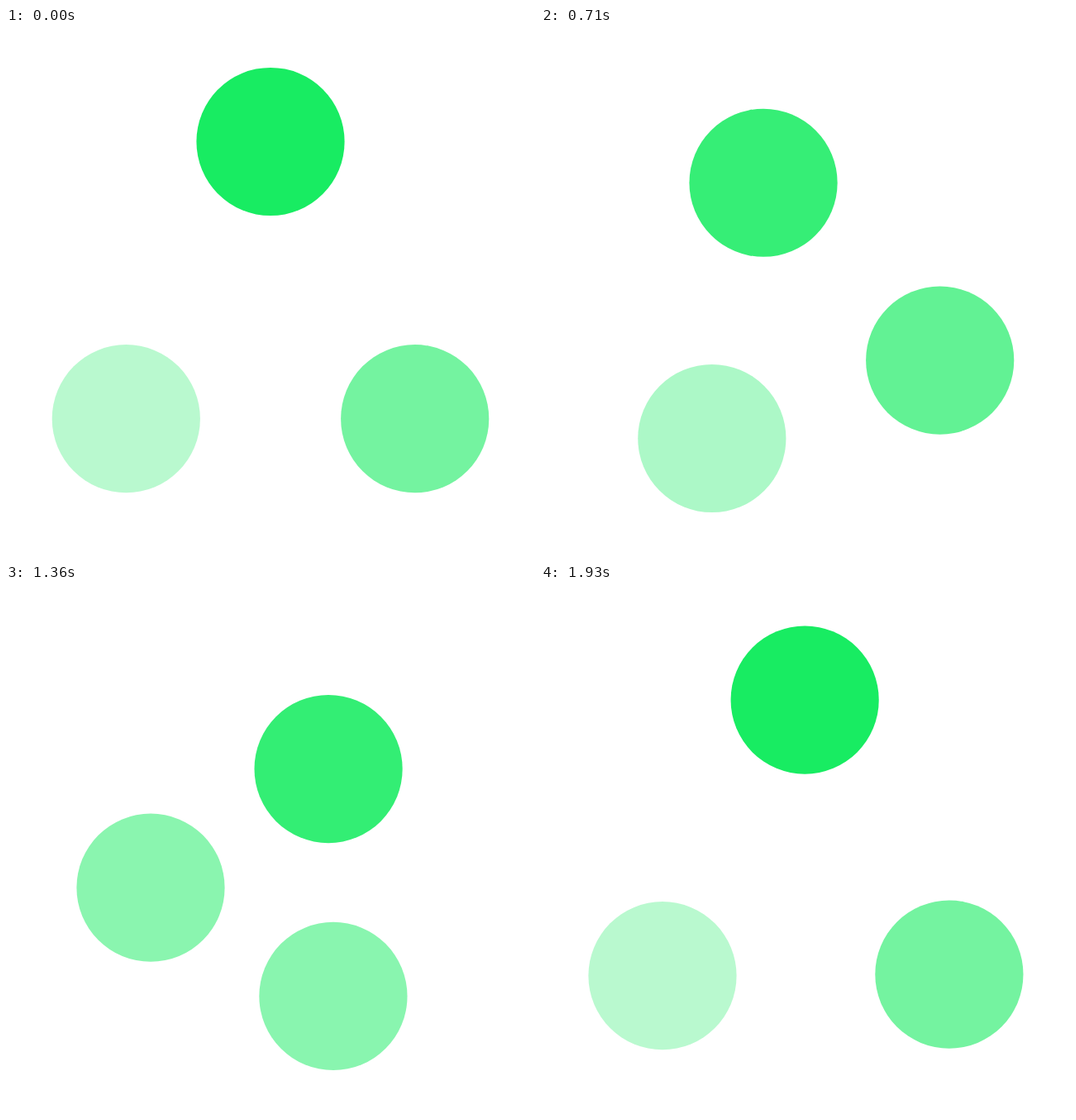
Write an HTML page that moves like this. It is 640 by 640 pixels and loops after 2000 ms.

```html
<!DOCTYPE html>
<html lang="en">
<head>
<meta charset="utf-8">
<title>Three circling dots</title>
<style>
html, body { margin: 0; width: 100%; height: 100%; overflow: hidden; background: #fff; }
svg { display: block; width: 100%; height: 100%; }
circle { fill: #18ec62; }
</style>
</head>
<body>
<svg viewBox="0 0 640 640"></svg>
<script>
const svg = document.querySelector('svg');
const LOOP = 2000, STEPS = 28, FRAMES = 50, LEG = 25;
const corners = [[320, 137.5], [494.7, 472.7], [145.3, 472.7]];
const alphas = [1, 0.6, 0.3];

const make = name => document.createElementNS('http://www.w3.org/2000/svg', name);
const shift = (p, from, to, k) => p.map((v, i) => v + (to[i] - from[i]) * k);
const ease = t => t * t * (3 - 2 * t);

function curve(...points) {
  const path = make('path');
  const [start, ...rest] = points;
  path.setAttribute('d', `M${start} C${rest.join(' ')}`);
  return path;
}

// Each dot visits the next two corners, passing smoothly through the middle one.
const dots = corners.map((a, i) => {
  const b = corners[(i + 1) % 3], c = corners[(i + 2) % 3];
  const circle = svg.appendChild(make('circle'));
  circle.setAttribute('r', 89.6);
  const legs = [
    curve(a, shift(a, a, b, 1 / 6), shift(b, a, c, -1 / 6), b),
    curve(b, shift(b, a, c, 1 / 6), shift(c, b, c, -1 / 6), c)
  ];
  return { circle, legs };
});

function draw(now) {
  // The picture is held in 28 steps per loop, taken from a 25 fps timeline.
  const time = Math.round(now / 10) * 10 % LOOP;
  const step = Math.floor((time + 5) * STEPS / LOOP) % STEPS;
  const frame = Math.ceil(step * FRAMES / STEPS);
  const leg = Math.floor(frame / LEG);
  const t = ease(frame % LEG / LEG);

  dots.forEach(({ circle, legs }, i) => {
    const path = legs[leg];
    const { x, y } = path.getPointAtLength(path.getTotalLength() * t);
    const from = alphas[(i + leg) % 3], to = alphas[(i + leg + 1) % 3];
    circle.setAttribute('cx', x);
    circle.setAttribute('cy', y);
    circle.setAttribute('opacity', from + (to - from) * t);
  });
}

function tick() {
  draw(performance.now());
  requestAnimationFrame(tick);
}
draw(0);
requestAnimationFrame(tick);
</script>
</body>
</html>
```
